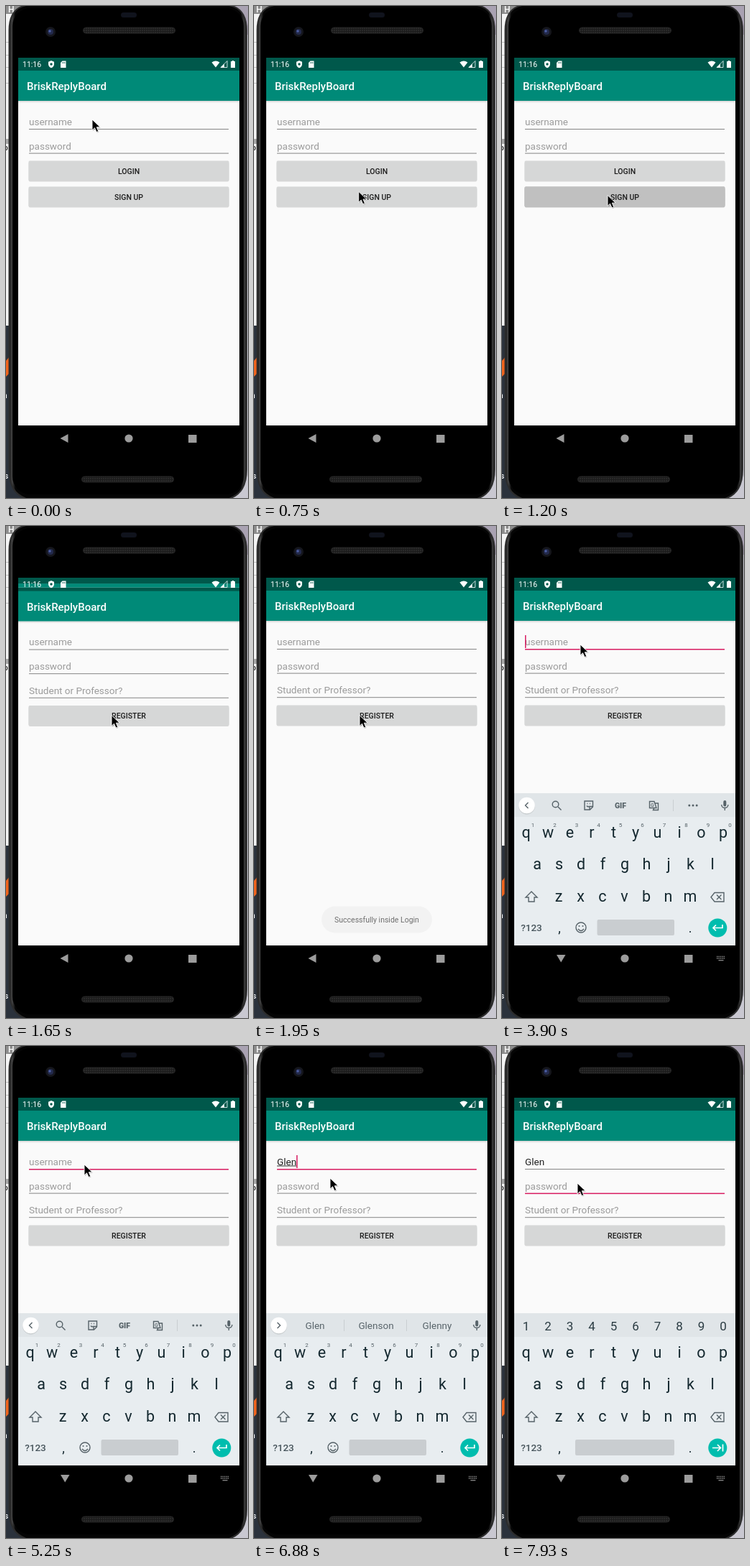
Recreate the animation shown at these times as an HTML page. Size 337x685 px, loop 8000 ms.

```html
<!DOCTYPE html>
<html lang="en">
<head>
<meta charset="utf-8">
<title>Phone sign-up</title>
<style>
html, body { margin: 0; width: 100%; height: 100%; overflow: hidden; background: #000; }
svg { display: block; width: 337px; height: 685px; font-family: Roboto, sans-serif; }
.mid { text-anchor: middle; }
.bold { font-weight: 500; }
.hint { font-size: 13.5px; fill: #9b9b9b; }
.key { font-size: 21.5px; fill: #14282f; }
.line { fill: none; stroke: #566268; stroke-width: 1.4; }
</style>
</head>
<body>
<svg id="stage" viewBox="0 0 337 685"></svg>
<script>
const LOOP = 8000;
const NAME = 'Glen';
const stage = document.getElementById('stage');

const rect = (x, y, w, h, fill, more = '') =>
  `<rect x="${x}" y="${y}" width="${w}" height="${h}" fill="${fill}" ${more}/>`;
const circle = (x, y, r, fill, more = '') =>
  `<circle cx="${x}" cy="${y}" r="${r}" fill="${fill}" ${more}/>`;
const path = (d, more) => `<path d="${d}" ${more}/>`;
const text = (s, x, y, cls, more = '') =>
  `<text x="${x}" y="${y}" class="${cls}" ${more}>${s}</text>`;
const group = (id, body, more = '') => `<g id="${id}" ${more}>${body}</g>`;
const row = (s, x, y, cls = 'key mid', more = '') =>
  [...s].map((c, i) => text(c, x + 30.5 * i, y, cls, more)).join('');

const button = (label, y, id = 'b') => `<g id="${id}">
  ${rect(31.5, y + 1, 279, 27.5, '#000', 'rx="2" opacity=".14" class="shade"')}
  ${rect(31.5, y - .5, 279, 27.5, '#d6d7d7', 'rx="1.5" class="face"')}<g class="ink"></g>
  ${text(label, 171, y + 17.5, 'mid bold', 'font-size="10.5" fill="#1c1c1c"')}</g>`;

const field = (hint, y, id) =>
  text(hint, 32, y - 5.1, 'hint', `id="${id}Text"`) +
  rect(32, y, 278, 1, '#858585', `id="${id}Line"`);

const page = (body) => rect(17, 72, 308, 512, '#fafafa') +
  rect(17, 132, 308, 3, 'url(#drop)') +
  rect(17, 72, 308, 18.5, '#00584b') + rect(17, 90, 308, 42, '#008a78') +
  text('BriskReplyBoard', 29, 117, 'bold', 'font-size="15" fill="#fff"') + body;

const defs = `<defs>
  <linearGradient id="drop" x2="0" y2="1"><stop stop-color="#000" stop-opacity=".16"/><stop offset="1" stop-color="#000" stop-opacity="0"/></linearGradient>
  <linearGradient id="rim" x2="1" y2="0"><stop stop-color="#141414"/><stop offset=".012" stop-color="#444"/><stop offset=".026" stop-color="#050505"/>
    <stop offset=".975" stop-color="#050505"/><stop offset=".99" stop-color="#3c3c3c"/><stop offset="1" stop-color="#161616"/></linearGradient>
  <pattern id="mesh" width="3" height="3" patternUnits="userSpaceOnUse">${rect(0, 0, 3, 3, '#1b1b1b')}${circle(1, 1, .8, '#3d3d3d')}</pattern>
  <clipPath id="screen">${rect(17, 72, 308, 512, '#000')}</clipPath>
  <clipPath id="reveal">${rect(17, 72, 308, 512, '#000', 'id="revealBox"')}</clipPath>
  <clipPath id="kbClip">${rect(17, 360, 308, 228, '#000')}</clipPath>
  <clipPath id="btnClip">${rect(31.5, 251.5, 279, 27.5, '#000', 'rx="1.5"')}</clipPath>
</defs>`;

const speaker = (x, y) => rect(x, y, 128, 8, 'url(#mesh)', 'rx="4" stroke="#262626"');
const backdrop = rect(0, 0, 337, 685, '#c9c8d1') + rect(300, 0, 37, 40, '#a9a2b2') + rect(0, 0, 30, 445, '#f4f4f4') +
  rect(0, 0, 30, 11, '#8d8d8d') + text('H', 3, 9, 'bold', 'font-size="12" fill="#fff"') +
  [50, 68, 85, 107].map(y => rect(0, y, 6, 1, '#c4c4c4')).join('') +
  rect(0, 185, 6, 7, '#a9a9a9') + text('o', -3, 201, 'bold', 'font-size="10" fill="#222"') +
  rect(0, 445, 30, 240, '#2b323c') + path('M0 494L5 488V511L0 516Z', 'fill="#f0631c"') +
  text('n', -4, 546, 'bold', 'font-size="10" fill="#fff"') + text('s', -2, 658, 'bold', 'font-size="10" fill="#fff"');
const phone = path('M28 -1C12 2 4.500 14 4.500 34V645C4.500 668 12 680 28 686H311C327 680 335 668 335 645V34C335 14 327 2 311 -1Z', 'fill="url(#rim)" stroke="#2c2c2c" stroke-width="2"') +
  rect(9, 3, 322, 677, '#000', 'rx="25"') +
  rect(160, 9, 22, 7, '#10131d', 'rx="3.5"') +
  circle(62, 36, 7, '#15161c') + circle(62, 36, 4, '#232a4c') + circle(61, 35, 1.7, '#4e60a6') +
  speaker(107.5, 30) + speaker(105.5, 655);

const statusBar = text('11:16', 23, 85.2, '', 'font-size="10.5" fill="#fff"') +
  path('M63 76L67 77.700V81C67 83.600 65.300 85.500 63 86.200C60.700 85.500 59 83.600 59 81V77.700Z', 'fill="#fff"') +
  circle(63, 81, 1.7, '#00584b') +
  path('M78.500 76.500H83.500V86H76V79Z', 'fill="#fff"') +
  path('M78.700 78V80M80.300 78V80M81.900 78V80', 'stroke="#00584b" stroke-width=".7"') +
  path('M286.500 78.500Q292 74.500 297.500 78.500L292 85.500Z', 'fill="#fff"') +
  path('M308 76.500V85.500H299Z', 'fill="none" stroke="#fff" stroke-width=".8"') + path('M304 80.500V85.500H299Z', 'fill="#fff"') +
  path('M314.800 76H317.200V77H319V86H313V77H314.800Z', 'fill="#fff"');

const nav = path('M75.500 602L86.500 596V608Z', 'id="back" fill="#9c9c9c"') +
  path('M76 597H88.500L82.200 607.500Z', 'id="down" fill="#9c9c9c"') +
  circle(171, 602, 5.6, '#9c9c9c') + rect(254, 597, 11.5, 11, '#9c9c9c') +
  group('imeIcon', path('M299 599.500H311M299 602H311', 'stroke="#8a8a8a" stroke-width="1.3" stroke-dasharray="1.400 1"') +
    path('M301.500 604.700H308.500', 'stroke="#8a8a8a" stroke-width="1.3"'));

const chevron = circle(34.500, 390, 11.4, '#000', 'opacity=".12"') + circle(34.500, 389, 11.3, '#fff') +
  path('M36.500 385L32.500 389L36.500 393', 'class="line" id="chevron"');
const tools = path('M78 391L82.500 395.500', 'class="line"') + circle(74.500, 387.500, 4.3, 'none', 'class="line"') +
  path('M115 383H126.500V391L122.500 395H115ZM126 390.500H122V395', 'class="line"') +
  path('M118.500 386.500H119.500M122 386.500H123M118 389.500Q120 392 121.500 390', 'class="line" stroke-width="1"') +
  text('GIF', 165, 393, 'mid', 'font-size="10.5" font-weight="900" fill="#566268"') +
  path('M205.500 383.500H212L215 392.500H205.500ZM213.500 386H217.500V395.500H210.500L212 392.500', 'class="line"') +
  text('G', 209.500, 391, 'mid bold', 'font-size="7" fill="#566268"') +
  path('M238.500 381V397', 'stroke="#c9ced1"') +
  group('dots', [-5.2, 0, 5.2].map(x => circle(266 + x, 389, 1.5, '#566268')).join(''));
const words = path('M125.500 381V397M212.500 381V397', 'stroke="#c9ced1"') +
  ['', NAME + 'son', NAME + 'ny'].map((w, i) => text(w, 85 + 85 * i, 394, 'mid', `id="word${i}" font-size="13.5" fill="#59656b"`)).join('');
const mic = rect(308.300, 382, 4, 8.500, '#566268', 'rx="2"') +
  path('M305.700 388Q306 392.500 310.300 392.500Q314.600 392.500 314.900 388M310.300 392.500V396', 'class="line"');

const keyboard = rect(17, 372, 308, 212, '#e8edf0') + rect(17, 372, 308, 33, '#e0e5e8') +
  group('strip', chevron + group('tools', tools) + group('words', words) + mic) +
  group('digits', row('1234567890', 33.500, 396, 'mid', 'font-size="17" fill="#2a3b42"')) +
  row('qwertyuiop', 33.500, 434) +
  group('sups', row('1234567890', 43, 419, 'mid', 'font-size="8" fill="#566268"')) +
  row('asdfghjkl', 49, 478) + row('zxcvbnm', 79, 523) +
  path('M41 509L49 517H45V523H37V517H33Z', 'class="line"') +
  path('M296 510.500H309V523H296L291 516.700ZM299 513.500L305.500 520M305.500 513.500L299 520', 'class="line"') +
  text('?123', 41, 564, 'mid bold', 'font-size="13.5" fill="#46545b"') + text(',', 80, 566, 'key mid', 'style="font-size:18px"') +
  group('emoji', circle(110, 559, 7, 'none', 'class="line"') + circle(107.500, 557, 1, '#566268') + circle(112.500, 557, 1, '#566268') +
    path('M106 561Q110 566 114 561', 'class="line"')) +
  rect(132.500, 548, 107.500, 22, '#c9cdd0', 'rx="2" id="space"') + text('.', 262, 566, 'key mid', 'style="font-size:18px"') +
  circle(300.300, 559.5, 13, '#00bdae') +
  path('', 'id="enter" fill="none" stroke="#fff" stroke-width="1.7"');

const arrow = 'M0 0V15L3.500 11.700L6 17.500L8.700 16.400L6.300 10.700H11.200Z';
stage.innerHTML = defs + backdrop + phone +
  `<g clip-path="url(#screen)">` +
  group('pageA', page(field('username', 171, 'u') + field('password', 204.6, 'p') + button('LOGIN', 216) + button('SIGN UP', 252, 'signUp'))) +
  `<g clip-path="url(#reveal)">` +
  group('pageB', page(field('username', 171, 'user') + field('password', 204.6, 'pass') + field('Student or Professor?', 238.2, 'role') +
    button('REGISTER', 250, 'reg') + rect(32, 166.500, 1, 1, '#333', 'id="compose"') + rect(32, 152, 1.500, 18, '#d81b60', 'id="caret"'))) +
  `</g></g>` + statusBar + nav +
  `<g clip-path="url(#kbClip)">` + group('kb', keyboard) + `</g>` +
  group('toast', rect(94, 529.500, 154, 37, '#eee', 'rx="18.5" opacity=".94"') +
    text('Successfully inside Login', 171, 552, 'mid', 'font-size="10.5" fill="#222"')) +
  group('mouse', path(arrow, 'transform="translate(.8 1.200)" fill="#000" opacity=".2"') +
    path(arrow, 'fill="#000" stroke="#fff" stroke-width=".9"'));

const $ = id => document.getElementById(id);
const set = (id, attrs) => { for (const k in attrs) $(id).setAttribute(k, attrs[k]); };
const show = (id, on) => set(id, { visibility: on ? 'inherit' : 'hidden' });
const span = (t, a, b) => Math.min(1, Math.max(0, (t - a) / (b - a)));
const smooth = p => p * p * (3 - 2 * p);

function sample(t) {
  const base = t >= 6880 ? 6880 : t >= 6140 ? 6140 : 0;
  return base + Math.floor((t - base) / 150) * 150;
}

const ink = stage.querySelector('#signUp .ink');
const face = stage.querySelector('#signUp .face');
const shade = stage.querySelector('#signUp .shade');
ink.setAttribute('clip-path', 'url(#btnClip)');
ink.innerHTML = circle(150, 266, 0, '#c0c0c0', 'id="ripple"');

const stops = [[100, 850, 120, 158, 147, 263.5], [2150, 2600, 147, 263.5, 109, 165], [6780, 6880, 109, 165, 106, 184], [6880, 7030, 106, 184, 105, 191]];

function mouse(t) {
  let s = stops[0];
  for (const m of stops) if (t >= m[0]) s = m;
  const p = smooth(span(t, s[0], s[1]));
  set('mouse', { transform: `translate(${s[2] + (s[4] - s[2]) * p} ${s[3] + (s[5] - s[3]) * p})` });
}

function pages(t) {
  const press = span(t, 840, 1130);
  const held = t >= 1200;
  set('ripple', { r: press * 150, cx: 147 + 14 * press });
  face.setAttribute('fill', held ? '#c0c0c0' : '#d6d7d7');
  shade.setAttribute('opacity', held ? .24 : .14);
  const e = 1 - Math.pow(1 - span(t, 1300, 1800), 3);
  set('pageA', { transform: `translate(0 ${-10 * e})` });
  set('pageB', { transform: `translate(0 ${21 * (1 - e)})` });
  set('revealBox', { y: 584 - 512 * e, height: 512 * e });
}

function form(t) {
  const onUser = t >= 2550 && t < 7180;
  const onPass = t >= 7180;
  const typed = NAME.slice(0, t < 6140 ? 0 : Math.floor((t - 6140) / 150) + 1);
  const label = $('userText');
  label.textContent = typed || 'username';
  label.style.fill = typed ? '#222' : '';
  const w = typed ? label.getComputedTextLength() : 0;
  for (const [id, on] of [['userLine', onUser], ['passLine', onPass]])
    set(id, { fill: on ? '#d81b60' : '#858585', height: on ? 1.5 : 1 });
  set('compose', { width: w });
  show('compose', typed && onUser);
  const blinkOff = t >= 3450 && t < 6140 && Math.floor((t - 3450) / 450) % 2 === 0;
  show('caret', onUser ? t >= 2700 && !blinkOff : onPass && t < 7930);
  set('caret', { x: 32 + w * onUser, y: onPass ? 186 : 152 });
  return typed;
}

function keys(t, typed) {
  const p = span(t, 2650, 2900);
  const open = t >= 2700;
  const secret = t >= 7330;
  const suggest = t >= 6290;
  set('kb', { opacity: p, transform: `translate(0 ${42 * Math.pow(1 - p, 1.6)})` });
  show('back', !open);
  show('down', open);
  show('imeIcon', open);
  show('strip', !secret);
  show('digits', secret);
  show('sups', !secret);
  show('emoji', !secret);
  show('tools', !suggest);
  show('words', suggest && !secret);
  if (secret) show('tools', false);
  $('word0').textContent = typed;
  set('chevron', { d: suggest ? 'M32.500 385L36.500 389L32.500 393' : 'M36.500 385L32.500 389L36.500 393' });
  set('space', { x: secret ? 102 : 132.5, width: secret ? 138 : 107.5 });
  set('enter', { d: secret ? 'M293 559.500H304M300 555L304.500 559.500L300 564M307.500 554.500V564.500' : 'M307 555V559.500H294M298 555.500L294 559.500L298 563.500' });
  const turn = 180 * (span(t, 3300, 3900) + span(t, 4200, 4800));
  set('dots', { transform: `rotate(${turn} 266 389)` });
}

function draw(ms) {
  const t = sample(ms % LOOP);
  mouse(t);
  pages(t);
  keys(t, form(t));
  set('toast', { opacity: span(t, 1750, 2060) * (1 - span(t, 3350, 3850)) });
}

let start;
function tick(now) {
  start ??= now;
  draw(now - start);
  requestAnimationFrame(tick);
}
draw(0);
requestAnimationFrame(tick);
</script>
</body>
</html>
```
